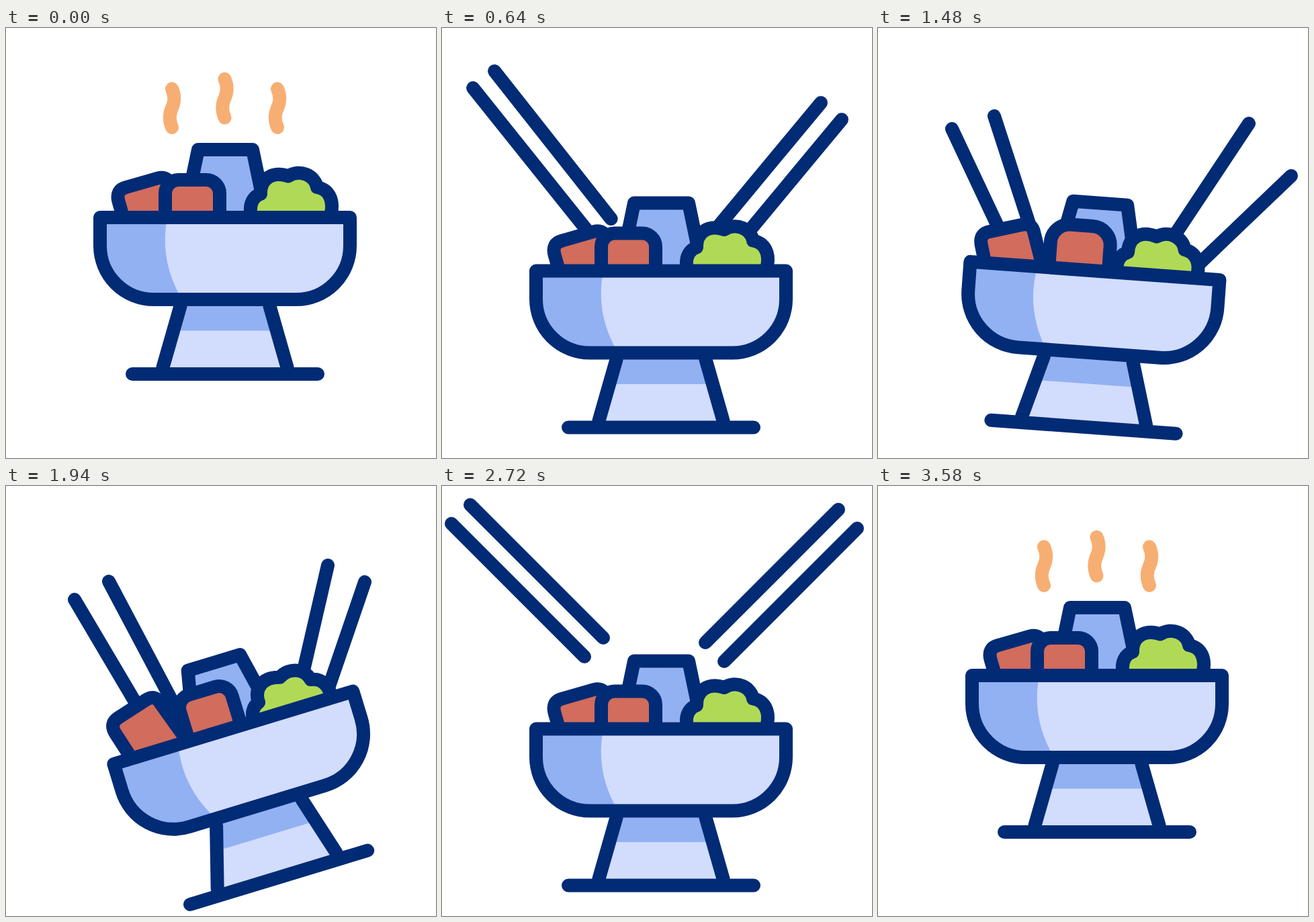
These frames come from a looping animation (640 by 640 pixels, 3.6 s). An HTML page:

```html
<!DOCTYPE html>
<html lang="en">
<head>
<meta charset="utf-8">
<title>Hot pot</title>
<style>
  html, body { margin: 0; height: 100%; overflow: hidden; background: #fff; }
  svg { display: block; width: 100vw; height: 100vh; }
  .ink { stroke: #022b75; stroke-width: 20; stroke-linecap: round; stroke-linejoin: round; fill: none; }
  .light { fill: #d2dcfc; }
  .mid { fill: #92b1f2; }
  .meat { fill: #d26c5c; }
  .leaf { fill: #b0da55; }
  .steam { stroke: #f7ae72; stroke-width: 20; stroke-linecap: round; fill: none; }
</style>
</head>
<body>
<svg viewBox="0 0 640 640">
  <defs>
    <path id="bowl" d="M140 282H512V324A80 80 0 0 1 432 404H220A80 80 0 0 1 140 324Z"/>
    <clipPath id="inside"><use href="#bowl"/></clipPath>
  </defs>
  <g id="sticks"></g>
  <g id="pot">
    <path class="ink mid" d="M267 272L286 181H367L386 272"/>
    <path id="slab" class="ink meat" d="M191 340L167.500 258Q163 241 179 237L226 223.500Q239 220 243.500 231L280 340"/>
    <path id="cube" class="ink meat"/>
    <path id="greens" class="ink leaf" d="M364 330V273C363 260 369 250 379 247C378 226 395 212 420 220.500C438 209 460 220 463 237C480 240 488 255 484 275V330"/>
    <path class="light" d="M259.500 410L233.500 512H418.500L392.500 410Z"/>
    <path class="mid" d="M259.500 410L249 450.500H403L392.500 410Z"/>
    <path class="ink" d="M259.500 414L233.500 505M392.500 414L418.500 505M188 515H464"/>
    <use href="#bowl" class="light"/>
    <path class="mid" clip-path="url(#inside)" d="M140 282H240C233 320 236 360 262 404H140"/>
    <use href="#bowl" class="ink"/>
  </g>
  <g id="steams"></g>
</svg>
<script>
const LOOP = 3600, LENGTH = 280;
const $ = id => document.getElementById(id);

function add(parent, tag, attrs) {
  const el = document.createElementNS('http://www.w3.org/2000/svg', tag);
  for (const k in attrs) el.setAttribute(k, attrs[k]);
  return $(parent).appendChild(el);
}

const plus = (a, ...d) => a.map((v, i) => v + d[i]);

// Keys are [time, ...values]
const drop = [[0, 0], [240, 108], [500, 79.5], [2740, 79.5], [3220, 0.6], [LOOP, 0]];
const tilt = [[660, 0], [850, 3], [1140, -6.66], [1230, -9], [1480, 4.15], [1550, 5],
              [1940, -16.9], [2160, -11.7], [2420, 0]];

// Food slides through three poses and back
const slide = (a, b, c) => {
  const home = a.map(() => 0);
  return [[660, ...home], [1140, ...a], [1480, ...b], [1940, ...c], [2440, ...home]];
};
const slab = slide([-19, 4], [-13, -2], [-12, -19]);
const greens = slide([15, 11], [-6, 4], [-6, 10]);
const cube = slide([20, -2.5, 0], [20, -10, 8], [20, -10, 0]);

// A pose is the outer end x, y and the angle
function stick(side, x, y, dip, stir, lift, lean) {
  const rest = [x, y, 90 - 45 * side];
  const keys = [
    [460, ...rest],
    [640, ...dip],
    [800, ...plus(dip, 18 * side, 32, 2 * side)],
    [1140, ...stir],
    [1210, ...plus(stir, -4 * side, 8 * side, -1)],
    [1480, ...lift],
    [1940, ...lean],
    [2130, ...plus(lean, 0, -25, 0)],
    [2450, ...plus(rest, 2 * side, -11, side)],
    [2660, ...rest]
  ];
  return { keys, el: add('sticks', 'line', { class: 'ink' }) };
}

const sticks = [
  stick(1, 14, 56, [46, 89, 51.3], [25, 237, 37.5], [110, 150, 64.8], [102, 169, 59.4]),
  stick(1, 42, 28, [78, 64, 51.7], [68, 194, 43.6], [173, 131, 72], [153, 142, 62.1]),
  stick(-1, 590, 35, [564, 111, 129.7], [545, 118, 121.3], [552, 142, 123.6], [479, 118, 103]),
  stick(-1, 618, 63, [595, 136, 129.7], [606, 182, 132.8], [615, 220, 136.3], [534, 143, 108.9])
];

const steams = [-1, 0, 1].map(n => add('steams', 'path', {
  class: 'steam', pathLength: 1, 'stroke-dasharray': '1 2',
  transform: `translate(${78.5 * n} ${14.5 * n * n})`,
  d: 'M325.500 133.500c-5 -12 -4 -20 0 -29c4 -9 5 -17 0 -28.500'
}));

function slope(keys, i, c) {
  if (!keys[i - 1] || !keys[i + 1]) return 0;
  const d = j => (keys[j + 1][c] - keys[j][c]) / (keys[j + 1][0] - keys[j][0]);
  const p = d(i - 1), q = d(i);
  return p * q > 0 ? 2 * p * q / (p + q) : 0;
}

// Monotone cubic through the keys, held at both ends
function at(keys, t) {
  const n = keys.length - 1;
  if (t <= keys[0][0]) return keys[0].slice(1);
  if (t >= keys[n][0]) return keys[n].slice(1);
  let i = 0;
  while (keys[i + 1][0] <= t) i++;
  const a = keys[i], b = keys[i + 1], h = b[0] - a[0], u = (t - a[0]) / h;
  const s = u * u * (3 - 2 * u);
  return a.slice(1).map((v, k) => v + (b[k + 1] - v) * s
    + h * u * (1 - u) * ((1 - u) * slope(keys, i, k + 1) - u * slope(keys, i + 1, k + 1)));
}

const ramp = (from, to, t) => at([[from, 0], [to, 1]], t)[0];
const move = (id, keys, t) => $(id).setAttribute('transform', `translate(${at(keys, t)})`);

function drawSteam(t) {
  const offset = t < LOOP / 2 ? -ramp(0, 220, t) : 1 - ramp(3360, 3570, t);
  for (const el of steams) {
    el.setAttribute('stroke-dashoffset', offset);
    el.setAttribute('visibility', Math.abs(offset) > 0.995 ? 'hidden' : 'visible');
  }
}

function drawSticks(t) {
  const len = (ramp(140, 420, t) - ramp(2760, 3080, t)) * LENGTH;
  for (const { keys, el } of sticks) {
    const [x, y, deg] = at(keys, t), r = deg * Math.PI / 180;
    el.setAttribute('x1', x);
    el.setAttribute('y1', y);
    el.setAttribute('x2', x + len * Math.cos(r));
    el.setAttribute('y2', y + len * Math.sin(r));
    el.setAttribute('visibility', len > 1 ? 'visible' : 'hidden');
  }
}

function drawCube(t) {
  const [x, y, w] = at(cube, t), r = 20 + w;
  $('cube').setAttribute('d', `M${237 + x} 330V${226 + r + y}a${r} ${r} 0 0 1 ${r} ${-r}`
    + `H${318 + x + w - r}a${r} ${r} 0 0 1 ${r} ${r}V330`);
}

function draw() {
  const t = performance.now() % LOOP;
  $('pot').setAttribute('transform', `translate(0 ${at(drop, t)}) rotate(${at(tilt, t)} 326 239.5)`);
  move('slab', slab, t);
  move('greens', greens, t);
  drawCube(t);
  drawSticks(t);
  drawSteam(t);
  requestAnimationFrame(draw);
}
draw();
</script>
</body>
</html>
```
